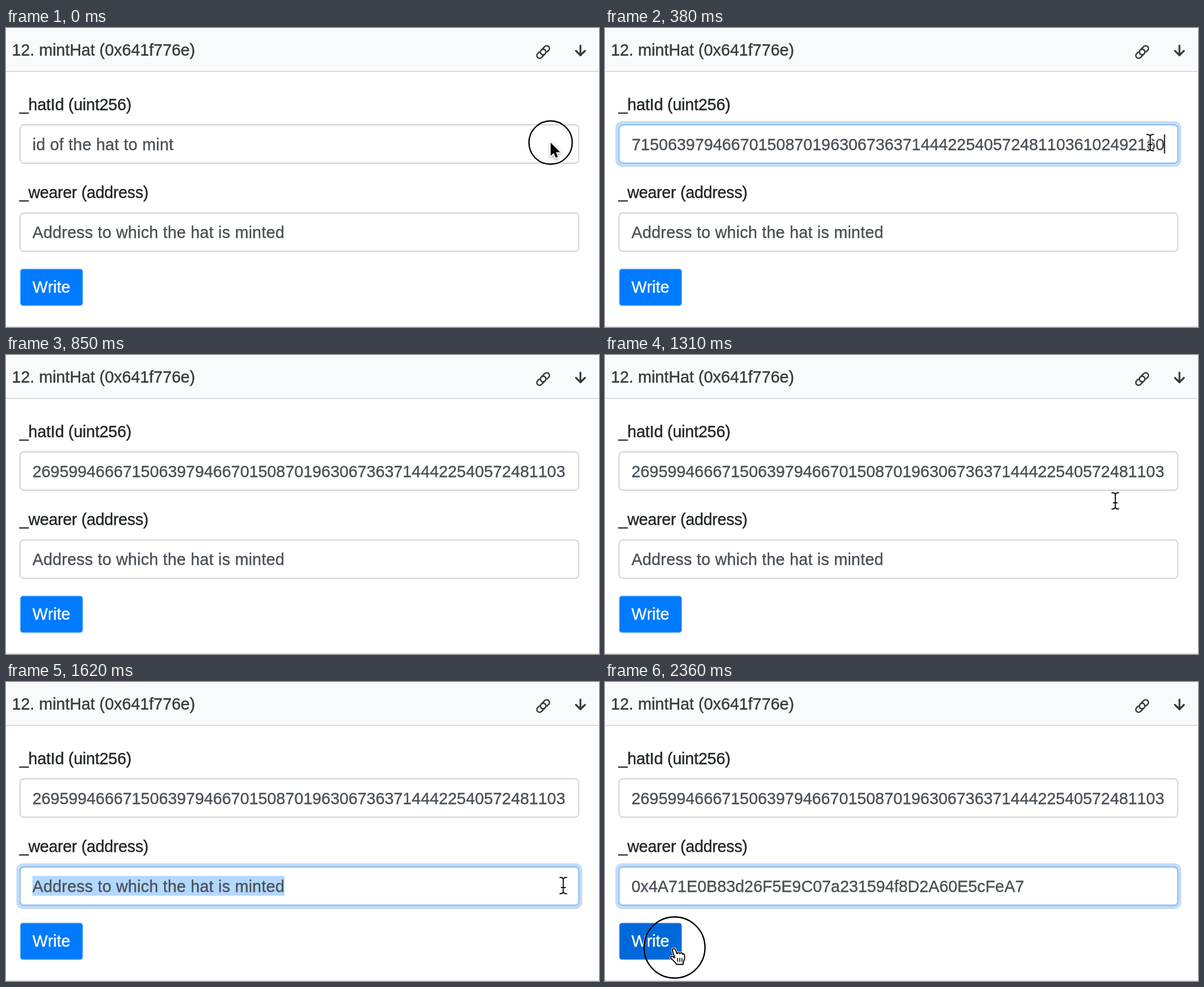
An HTML page with a canvas that plays this animation: 1054x531 px, repeating every 2490 ms.

```html
<!DOCTYPE html>
<html lang="en">
<head>
<meta charset="utf-8">
<title>mintHat form</title>
<style>
  html, body { margin: 0; width: 100%; height: 100%; overflow: hidden; background: #fff; }
  canvas { display: block; }
</style>
</head>
<body>
<canvas id="stage" width="1054" height="531"></canvas>
<script>
const ctx = document.getElementById('stage').getContext('2d');
const LOOP = 2490;
const HAT_ID = '269599466671506397946670150870196306736371444225405724811036102492160';
const WEARER = '0x4A71E0B83d26F5E9C07a231594f8D2A60E5cFeA7';
const INK = '#212529', INPUT_INK = '#495057';
const LEFT = 47, RIGHT = 994.5;

const APPROACH = { times: [1310, 1380, 1460], from: [907, 259], to: [990, 361], ease: p => 1 - (1 - p) ** 2 };
const TO_BUTTON = { times: [2000, 2080, 2150, 2230], from: [999, 357], to: [123.5, 471.5], ease: p => p * p * (3 - 2 * p) };

const ARROW = new Path2D('M0 0V23.5L5.4 18.6L9.2 27L13 25.3L9.4 17H16.8Z');
const HAND = new Path2D('M-3.5 6C-5 2 .5 .5 2 4.5L4.5 11C5.5 8.5 9 8.5 9.5 11C11 8.5 14 9 14.2 12' +
  'C16 10.5 18 11.5 18 14.5C18.5 20 17.5 23 15.5 26V30H3.5C2 26-2 23.5-6 19.5C-8.5 16.5-5 14.5-2.5 16.5L.5 18.5Z');
const HAND_LINES = new Path2D('M5.5 19V25M9.5 19V25M13.3 19V25');
const IBEAM = new Path2D('M-6 -14.5C-2 -14.5 0 -13.5 0 -10.5C0 -13.5 2 -14.5 6 -14.5' +
  'M-6 14.5C-2 14.5 0 13.5 0 10.5C0 13.5 2 14.5 6 14.5M0 -11V11M-3.5 3.5H3.5');

function textWidth(str, spacing = 0) {
  ctx.font = '28.87px "Liberation Sans", Arial, sans-serif';
  ctx.fontKerning = 'none';
  ctx.letterSpacing = spacing + 'px';
  return ctx.measureText(str).width;
}

// A hairline outline gives the slightly heavy look of smoothed text.
function text(str, x, y, color = INK, spacing = 0) {
  const width = textWidth(str, spacing);
  ctx.fillStyle = ctx.strokeStyle = color;
  ctx.lineWidth = 0.4;
  ctx.fillText(str, x, y);
  ctx.strokeText(str, x, y);
  return width;
}

function box(x, y, w, h, r, fill, stroke, line = 1.8) {
  ctx.beginPath();
  ctx.roundRect(x, y, w, h, r);
  if (fill) { ctx.fillStyle = fill; ctx.fill(); }
  if (stroke) { ctx.strokeStyle = stroke; ctx.lineWidth = line; ctx.stroke(); }
}

function at(x, y, draw) {
  ctx.save();
  ctx.translate(x, y);
  ctx.lineCap = ctx.lineJoin = 'round';
  draw();
  ctx.restore();
}

function strokePath(path, color, width) {
  ctx.strokeStyle = color;
  ctx.lineWidth = width;
  ctx.stroke(path);
}

function linkIcon() {
  at(954.7, 42.6, () => {
    ctx.rotate(-Math.PI / 4);
    for (let i = 0; i < 2; i++) {
      const loop = new Path2D();
      loop.moveTo(-5.2, -4.8);
      loop.arc(-9, 0, 4.8, -Math.PI / 2, Math.PI / 2, true);
      loop.arc(0.2, 0, 4.8, Math.PI / 2, -1.2, true);
      strokePath(loop, '#343a40', 2.6);
      ctx.rotate(Math.PI);
    }
  });
}

function downIcon() {
  at(1021, 40, () => strokePath(new Path2D('M0 -9V8M-8 .5L0 8.5L8 .5'), '#343a40', 3.2));
}

function header() {
  ctx.fillStyle = '#f8fafc';
  ctx.fillRect(0, 0, 1054, 77);
  ctx.fillStyle = '#d5d7da';
  ctx.fillRect(0, 76.3, 1054, 1.7);
  ctx.fillStyle = '#dfdfdf';
  ctx.fillRect(0, 529.6, 1054, 1.4);
  text('12. mintHat (0x641f776e)', 10.5, 49, '#343a40');
  linkIcon();
  downIcon();
}

function field(y, focus) {
  if (focus) {
    ctx.globalAlpha = focus;
    box(18.4, y - 6.5, 1005.8, 81, 12, '#c2dcfb');
    ctx.globalAlpha = 1;
  }
  box(25, y, 993, 68, 6.5, '#fff', '#ced0d3');
  if (focus) {
    ctx.globalAlpha = focus;
    box(25, y, 993, 68, 6.5, null, '#85bbf5');
    ctx.globalAlpha = 1;
  }
}

function placeholder(str, y, selected) {
  const spacing = 0.25;
  if (selected) {
    ctx.fillStyle = '#b3d7fe';
    ctx.fillRect(LEFT, y - 28, textWidth(str, spacing), 35);
  }
  text(str, LEFT, y, INPUT_INK, spacing);
}

function caret(x, y) {
  ctx.fillStyle = '#111';
  ctx.fillRect(x - 1, y - 28, 2, 34);
}

function hatField(t) {
  const focus = t < 80 || t >= 850 ? 0 : t < 150 ? 0.5 : 1;
  field(172, focus);
  if (t < 380) return placeholder('id of the hat to mint', 217, focus > 0);
  ctx.save();
  ctx.beginPath();
  ctx.rect(LEFT, 173, RIGHT - LEFT, 66);
  ctx.clip();
  text(HAT_ID, focus ? RIGHT - textWidth(HAT_ID) : LEFT, 217, INPUT_INK);
  ctx.restore();
  if (focus) caret(RIGHT, 217);
}

function wearerField(t) {
  const focus = t < 1540 ? 0 : t < 1620 ? 0.5 : 1;
  field(328.5, focus);
  if (t < 1690) return placeholder('Address to which the hat is minted', 372.5, focus > 0);
  const width = text(WEARER, LEFT, 372.5, INPUT_INK);
  if (t >= 1920 && t < 2360) {
    ctx.fillStyle = '#ee5f5b';
    for (let x = LEFT + 3; x < LEFT + width - 2; x += 8.7) {
      ctx.beginPath();
      ctx.arc(x, 375, 2.8, 0, 7);
      ctx.fill();
    }
  }
  if (t < 2230) caret(LEFT + width, 372.5);
}

function button(hover) {
  box(25, 427.6, 111.8, 65.8, 5.5, null, '#cfe0f4', 1.6);
  box(25.7, 428.3, 110.4, 64.4, 4.5, hover ? '#0069d9' : '#007bff');
  text('Write', LEFT, 470, '#fff');
}

function along(path, t) {
  const { times, from, to, ease } = path;
  const time = times.filter(s => s <= t).pop();
  const p = ease((time - times[0]) / (times[times.length - 1] - times[0]));
  return from.map((v, i) => v + (to[i] - v) * p);
}

const overButton = (x, y) => x > 25 && x < 137 && y > 428 && y < 493;

function pointerAt(t) {
  if (t < 80) return { pos: [968, 203.5], kind: 'arrow', ring: 38.5 };
  if (t < 620) return { pos: [969, 203.5], kind: 'ibeam' };
  if (t < 1310) return null;
  if (t < 1460) return { pos: along(APPROACH, t), kind: 'ibeam' };
  if (t < 1540) return { pos: APPROACH.to, kind: 'arrow', ring: 38.5 };
  if (t < 1770) return { pos: [990.5, 361.5], kind: 'ibeam' };
  if (t < 2000) return null;
  const pos = along(TO_BUTTON, t);
  const kind = pos[1] < 397 ? 'ibeam' : overButton(...pos) ? 'hand' : 'arrow';
  return { pos, kind, ring: t >= 2360 ? 54.2 : 0 };
}

function drawPointer({ pos, kind, ring }) {
  at(...pos, () => {
    if (ring) {
      ctx.beginPath();
      ctx.arc(0, 0, ring, 0, 7);
      ctx.strokeStyle = '#000';
      ctx.lineWidth = 2.4;
      ctx.stroke();
    }
    if (kind === 'ibeam') {
      strokePath(IBEAM, '#fff', 4.5);
      strokePath(IBEAM, '#111', 2);
    } else if (kind === 'arrow') {
      ctx.shadowColor = 'rgba(0,0,0,.35)';
      ctx.shadowBlur = 4;
      ctx.shadowOffsetY = 2;
      strokePath(ARROW, '#fff', 3.5);
      ctx.shadowColor = 'transparent';
      ctx.fillStyle = '#000';
      ctx.fill(ARROW);
    } else {
      strokePath(HAND, '#fff', 3.6);
      ctx.fillStyle = '#fff';
      ctx.fill(HAND);
      strokePath(HAND, '#000', 1.9);
      strokePath(HAND_LINES, '#000', 1.6);
    }
  });
}

function render(t) {
  const pointer = pointerAt(t);
  ctx.fillStyle = '#fff';
  ctx.fillRect(0, 0, 1054, 531);
  header();
  text('_hatId (uint256)', 24, 146, INK, -0.2);
  hatField(t);
  text('_wearer (address)', 24, 302, INK, -0.3);
  wearerField(t);
  button(pointer && overButton(...pointer.pos));
  if (pointer) drawPointer(pointer);
}

const start = performance.now();
function tick() {
  render((performance.now() - start) % LOOP);
  requestAnimationFrame(tick);
}
tick();
</script>
</body>
</html>
```
